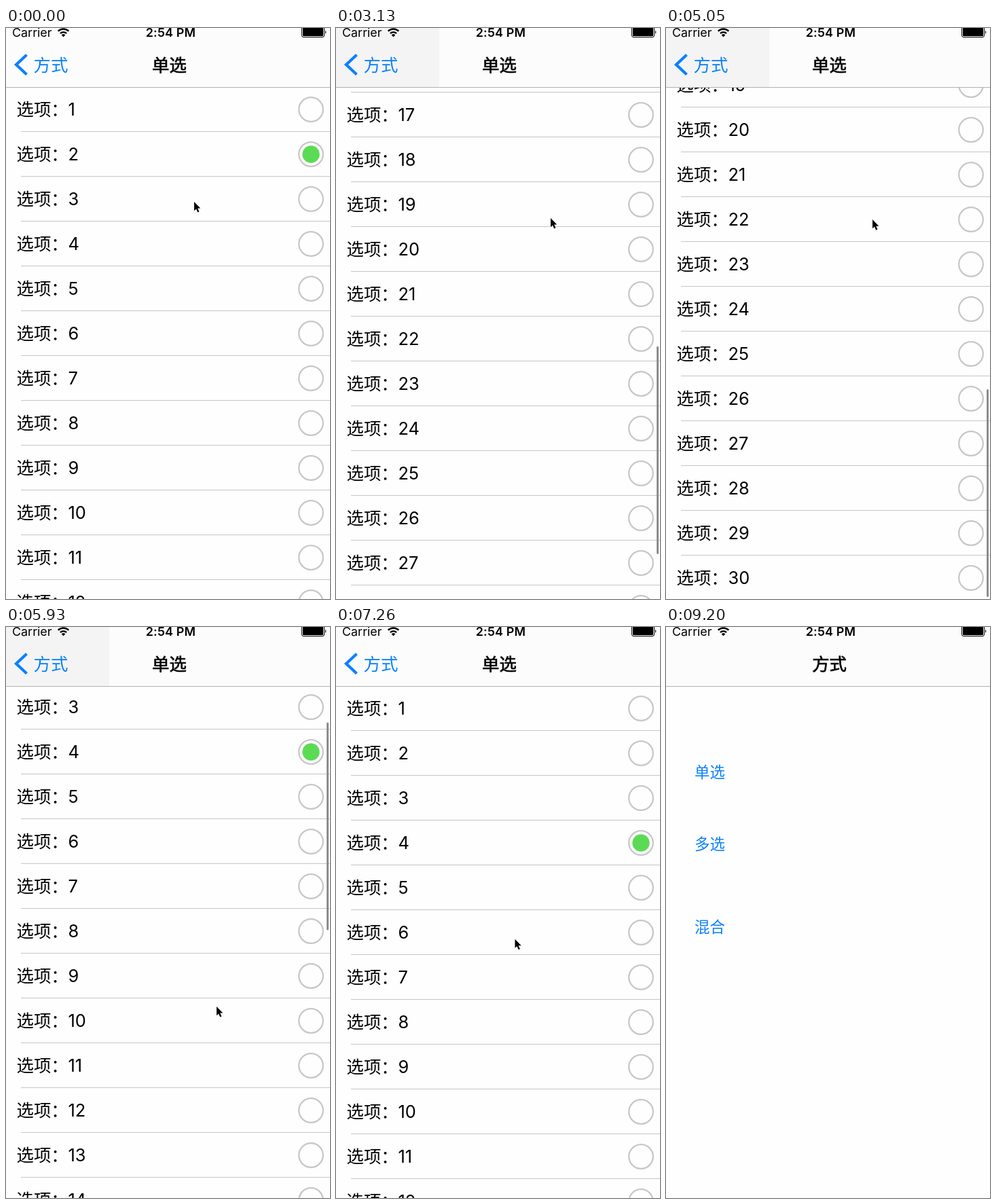
Write an HTML page that moves like this. It is 477x841 px and loops after 9.37 s.

```html
<!DOCTYPE html>
<html lang="zh-CN">
<head>
<meta charset="utf-8">
<title>单选</title>
<style>
  html, body { margin: 0; width: 100%; height: 100%; overflow: hidden; background: #fefefe; }
  svg { display: block; width: 477px; height: 841px; }
  text { font: 25.4px Inter, "Noto Sans CJK SC", sans-serif; white-space: pre; }
  .zh { font-family: "Noto Sans CJK SC", "Noto Sans CJK", sans-serif; }
  .title { stroke: #000; stroke-width: .7; }
  .blue { fill: #0a80ff; }
  .menu { font-size: 22.4px; }
  .status { font-size: 17.9px; }
  .clock { font-weight: 600; letter-spacing: .15px; }
  .ring { fill: none; stroke: #c8c8c8; stroke-width: 2.3; }
  .line { fill: #c6c6c6; }
</style>
</head>
<body>
<svg viewBox="0 0 477 841">
  <defs>
    <linearGradient id="edge">
      <stop offset="0" stop-opacity="0"/>
      <stop offset="1" stop-opacity=".14"/>
    </linearGradient>
  </defs>
  <rect width="477" height="841" fill="#fefefe"/>

  <g id="menu">
    <text class="zh menu blue" x="42" y="222">单选</text>
    <text class="zh menu blue" x="42" y="328">多选</text>
    <text class="zh menu blue" x="42" y="450">混合</text>
  </g>
  <rect id="dim" y="87" width="477" height="754"/>

  <g id="page">
    <rect x="-11" y="87" width="11" height="754" fill="url(#edge)"/>
    <rect y="87" width="477" height="754" fill="#fefefe"/>
    <g id="list">
      <g id="lines" class="line"></g>
      <circle id="dot" cx="449" r="12.7" fill="#5bdb53"/>
    </g>
    <rect id="bar" x="472" width="3" rx="1.5" fill="#8c8c8c"/>
  </g>

  <rect width="477" height="87" fill="#fcfcfc"/>
  <rect id="tint" width="152" height="87" fill="#f4f4f4"/>
  <rect y="87" width="477" height="1" fill="#b2b2b2"/>

  <text class="status" x="9" y="13">Carrier</text>
  <text class="status clock" x="242.5" y="13" text-anchor="middle">2:54 PM</text>
  <g fill="none" stroke="#000" stroke-width="2.4">
    <path d="M76.7 4.7A11 11 0 0 1 92.3 4.7"/>
    <path d="M79.9 8A6.5 6.5 0 0 1 89.1 8"/>
  </g>
  <path d="M84.5 13.2L81.7 10.3A4 4 0 0 1 87.3 10.3Z"/>
  <rect x="435.5" y="-2.5" width="33" height="16" rx="2.5" fill="none" stroke="#000"/>
  <rect x="437" y="-1" width="30" height="13" rx="1"/>
  <path d="M470 3.5Q472.5 6 470 9Z"/>

  <path id="chevron" d="M30.5 39.5L15 54L30.5 68.5" fill="none" stroke="#0a80ff" stroke-width="4.2"/>
  <text id="back" class="zh blue" y="63.7">方式</text>
  <text id="title" class="zh title" y="63.7">单选</text>
  <text id="home" class="zh title" x="215.2" y="63.7">方式</text>

  <path id="cursor" d="M0 0V13.2L3 10.5L5.2 15.6L7.4 14.6L5.2 9.6H9.3Z"
        stroke="#fff" stroke-width="1.2" paint-order="stroke"/>
</svg>
<script>
const LOOP = 9370, TICK = 148.1;
const WIDTH = 477, TOP = 87, PITCH = 66, ROWS = 30, END = 1224;
const $ = id => document.getElementById(id);

// Pointer stops: [time, x, y]
const stops = [
  [150, 277, 256], [1100, 320, 508], [1620, 318, 320], [2370, 315, 650],
  [3080, 316, 280], [3560, 316, 280], [4300, 308, 440], [5030, 304, 282],
  [5640, 310, 559], [7000, 310, 559], [7900, 75, 57], [8290, 75, 57], [9180, 450, 850]
];

const unit = (t, a, b) => Math.min(1, Math.max(0, (t - a) / (b - a)));
const hump = (t, a, b) => Math.sin(Math.PI * unit(t, a, b));
function ramp(t, a, b) {
  const u = unit(t, a, b);
  return u * u * (3 - 2 * u);
}

function pointer(t) {
  let [, x, y] = stops[0];
  for (let i = 1; i < stops.length; i++) {
    const [a, x0, y0] = stops[i - 1], [b, x1, y1] = stops[i];
    const k = ramp(t, a, b);
    x += (x1 - x0) * k;
    y += (y1 - y0) * k;
  }
  return [x, y];
}

// Two flings down, one back up, each ending in a small bounce
const scroll = t => Math.round(
  1048 * ramp(t, 2380, 3110) + 176 * ramp(t, 3430, 4000) + 32 * hump(t, 4300, 5000)
  - END * ramp(t, 5050, 6150) - 25 * hump(t, 6050, 6800));

// Taps choose the row under the pointer until scrolling begins
const picked = t => t < 300 ? 2 : 1 + Math.floor((pointer(Math.min(t, 1630))[1] - TOP) / PITCH);
const rowY = n => 120 + PITCH * (n - 1);

function add(parent, tag, attrs, text = "") {
  const el = document.createElementNS("http://www.w3.org/2000/svg", tag);
  set(el, attrs);
  el.textContent = text;
  parent.appendChild(el);
}
function set(el, attrs) {
  for (const key in attrs) el.setAttribute(key, attrs[key]);
}

for (let n = 1; n <= ROWS; n++) {
  const y = rowY(n);
  add($("list"), "text", { class: "zh", x: 15.5, y: y + 9 }, "选项：");
  add($("list"), "text", { x: 91.5, y: y + 9 }, n);
  add($("list"), "circle", { class: "ring", cx: 449, cy: y, r: 17.8 });
  add($("lines"), "rect", { x: 22, y: y + 32, width: 455, height: 1 });
}

function draw(t) {
  const y = scroll(t), low = Math.max(0, -y), high = Math.max(0, y - END);
  set($("list"), { transform: `translate(0 ${-y})` });
  set($("lines"), { opacity: low ? 0 : 1 });
  set($("dot"), { cy: rowY(picked(t)) });
  set($("bar"), {
    y: 92.5 + (y + low - high) * 0.359 + high,
    height: 306 - low - high,
    opacity: ramp(t, 2380, 2510) - ramp(t, 6960, 7260)
  });

  const p = ramp(t, 7996, 8402), shift = p ** 1.24, fade = (1 - p) ** 2;
  set($("page"), { transform: `translate(${WIDTH * p} 0)`, opacity: p < 1 ? 1 : 0 });
  set($("menu"), { transform: `translate(${-0.3 * WIDTH * (1 - p)} 0)` });
  set($("dim"), { opacity: 0.11 * (1 - p) });
  set($("chevron"), { opacity: (1 - p) ** 5 });
  set($("back"), { x: 40.5 + 175 * shift, opacity: fade });
  set($("title"), { x: 215 + 262 * shift, opacity: fade });
  set($("home"), { opacity: unit(p, 0.4, 1) });
  set($("tint"), { opacity: y > 0 || (p > 0 && p < 1) ? 1 : 0 });

  set($("cursor"), { transform: `translate(${pointer(t)})` });
}

const began = performance.now();
function frame() {
  const t = (performance.now() - began) % LOOP;
  draw(Math.floor(t / TICK) * TICK);
  requestAnimationFrame(frame);
}
draw(0);
requestAnimationFrame(frame);
</script>
</body>
</html>
```
